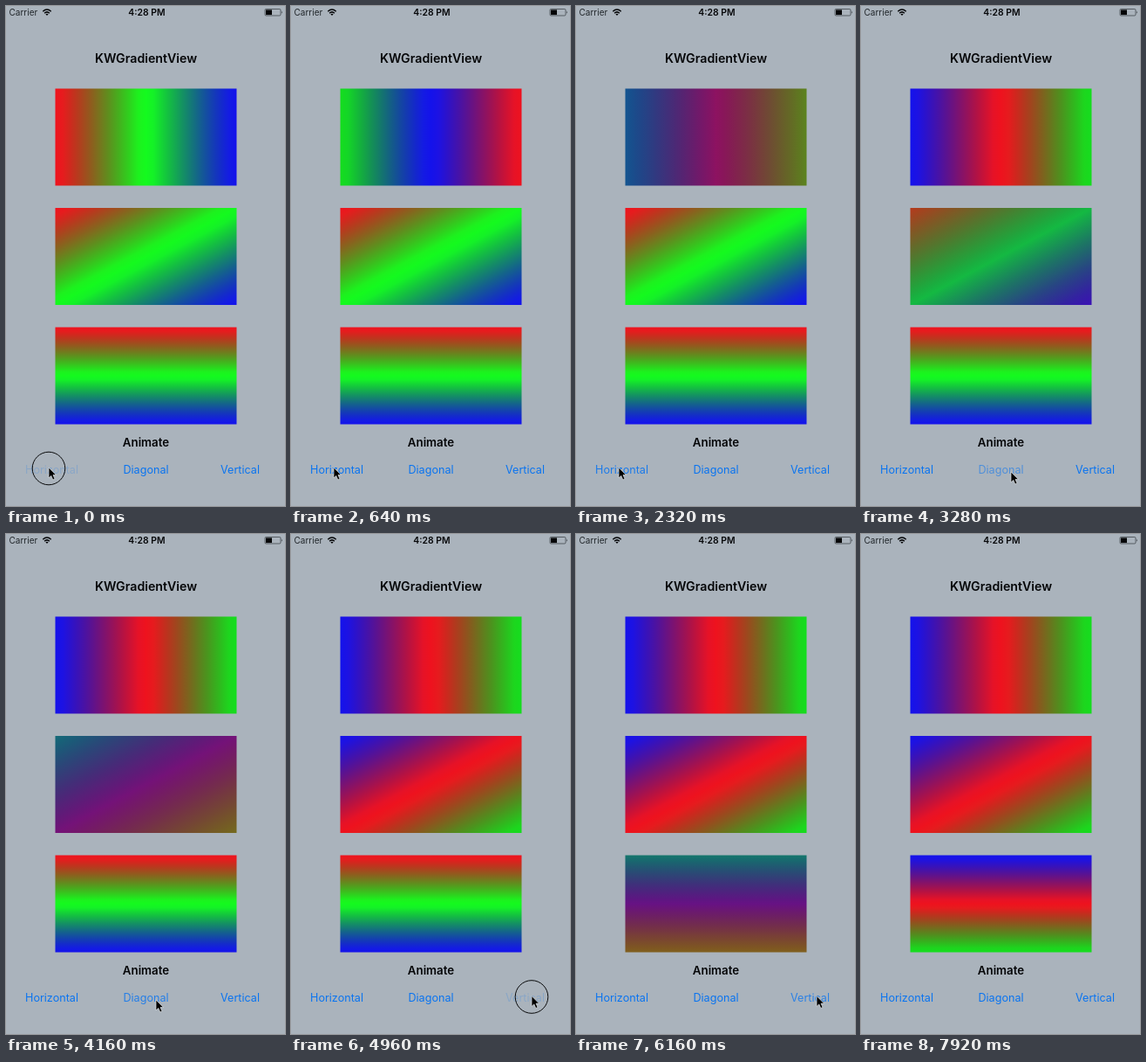
An HTML page that plays this animation: 320x572 px, repeating every 8 s.

```html
<!DOCTYPE html>
<html lang="en">
<head>
<meta charset="utf-8">
<title>Gradient demo</title>
<style>
  html, body { margin: 0; width: 100%; height: 100%; overflow: hidden; background: #aab3bc; }
  svg { display: block; width: 320px; height: 572px; }
  text { font-family: Inter, Roboto, sans-serif; fill: #050608; }
  .mid { text-anchor: middle; }
  .bold { font-weight: 600; }
  .button { font-size: 12.6px; fill: #0a74f0; text-anchor: middle; }
</style>
</head>
<body>
<svg viewBox="0 0 320 572">
  <defs>
    <linearGradient id="g0" x2="1" y2="0"></linearGradient>
    <linearGradient id="g1" x2="1" y2="1"></linearGradient>
    <linearGradient id="g2" x2="0" y2="1"></linearGradient>
  </defs>
  <rect width="320" height="572" fill="#aab3bc"/>

  <text x="3.5" y="11" font-size="10" style="fill:#22272b">Carrier</text>
  <g fill="none" stroke="#050608" stroke-width="1.5">
    <path d="M42.3 6.2Q47 1.8 51.7 6.2M44.1 8.2Q47 5.6 49.9 8.2"/>
    <path d="M45.4 9.3L47 11L48.6 9.3Q47 8 45.4 9.3Z" fill="#050608" stroke="none"/>
  </g>
  <text class="mid bold" x="161.5" y="11" font-size="10.4">4:28 PM</text>
  <rect x="297" y="3.5" width="18" height="7.5" rx="1.2" fill="none" stroke="#30353a" stroke-width=".7"/>
  <rect x="298" y="4.4" width="7" height="5.7" fill="#050608"/>
  <path d="M316 5.8Q317.6 7.2 316 8.7Z" fill="#30353a"/>

  <text class="mid bold" x="160.5" y="65" font-size="14.2">KWGradientView</text>
  <rect x="56.5" y="94.5" width="208" height="111" fill="url(#g0)"/>
  <rect x="56.5" y="231" width="208" height="111" fill="url(#g1)"/>
  <rect x="56.5" y="367.5" width="208" height="111" fill="url(#g2)"/>
  <text class="mid bold" x="160.5" y="504" font-size="13.3">Animate</text>

  <text class="button" x="52.5" y="535">Horizontal</text>
  <text class="button" x="160.5" y="535">Diagonal</text>
  <text class="button" x="268.5" y="535">Vertical</text>

  <g id="pointer">
    <circle id="ring" r="18.8" fill="none" stroke="#08090a" stroke-width="1"/>
    <path d="M0 -1V11L2.8 8.4L4.8 13L7 12L5 7.6H8.6Z" fill="#000" stroke="#dfe3e6" stroke-width=".7"/>
  </g>
</svg>
<script>
  const LOOP = 8000, STEP = 80, MORPH = 500, FADE = 470;
  const HOLD = 160, REST = 450, TRAVEL = 500, STOPS = 24;

  // Two release times per button, and where the pointer rests for each, then off stage
  const releases = [[120, 2020], [3155, 3910], [5095, 5935]];
  const spots = [[49, 529], [172, 534], [276, 529.5], [272, 590]];

  const $ = id => document.getElementById(id);
  const clamp = v => Math.max(0, Math.min(1, v));
  const mix = (a, b, k) => a + (b - a) * k;
  const smooth = k => k * k * (3 - 2 * k);
  const buttons = document.querySelectorAll('.button');

  const stops = releases.map((_, i) => Array.from({ length: STOPS + 1 }, (_, j) => {
    const stop = document.createElementNS('http://www.w3.org/2000/svg', 'stop');
    stop.setAttribute('offset', j / STOPS);
    return $('g' + i).appendChild(stop);
  }));

  // Share of primary c at place p (0 to 2) when the cycle has turned by whole steps n
  const share = (c, p, n) => Math.max(0, 1 - Math.abs((c - n + 3) % 3 - p));

  // Display response: flat peaks and darker blends
  const tone = w => Math.pow(Math.min(1, w * 1.06), 1.3);

  function colour(p, turn) {
    const n = Math.floor(turn), k = turn - n;
    const [r, g, b] = [0, 1, 2].map(c => tone(mix(share(c, p, n), share(c, p, n + 1), k)));
    const green = mix(250, 221, Math.min(1, turn));
    return `rgb(${[mix(20, 238, r), mix(18, green, g), mix(30, 235, b)].map(Math.round)})`;
  }

  function paint(i, t) {
    const turn = releases[i].reduce((sum, r) => sum + clamp((t - r) / MORPH), 0);
    stops[i].forEach((stop, j) => stop.setAttribute('stop-color', colour(2 * j / STOPS, turn)));
  }

  function opacity(i, t) {
    const release = releases[i].filter(r => t >= r - HOLD).pop();
    if (release === undefined) return 1;
    const left = 1 - clamp((t - release) / FADE);
    return 1 - .8 * left * left;
  }

  function place(t) {
    let [x, y] = spots[0];
    releases.forEach((pair, i) => {
      const k = smooth(clamp((t - pair[1] - REST) / TRAVEL));
      x = mix(x, spots[i + 1][0], k);
      y = mix(y, spots[i + 1][1], k);
    });
    $('pointer').setAttribute('transform', `translate(${x} ${y})`);
    const down = releases.flat().some(r => t >= r - HOLD && t < r);
    $('ring').setAttribute('visibility', down ? 'visible' : 'hidden');
  }

  function draw(t) {
    buttons.forEach((button, i) => {
      paint(i, t);
      button.setAttribute('opacity', opacity(i, t));
    });
    place(t);
  }

  const start = performance.now();
  function tick() {
    const t = (performance.now() - start) % LOOP;
    draw(Math.floor(t / STEP) * STEP);
    requestAnimationFrame(tick);
  }
  draw(0);
  requestAnimationFrame(tick);
</script>
</body>
</html>
```
